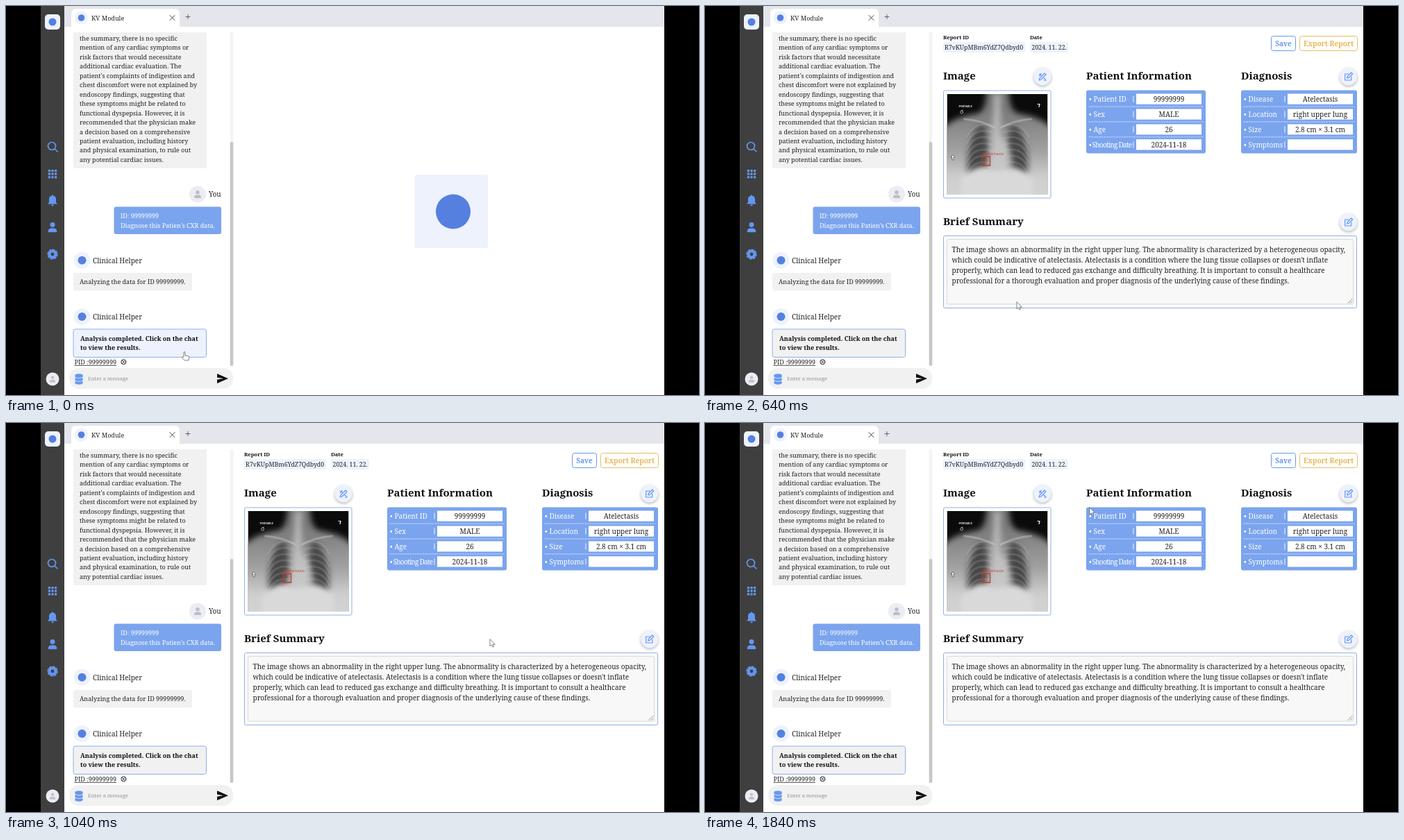
These frames come from a looping animation (998 px wide and 561 px high, 1920 ms). An HTML page with a canvas:

```html
<!DOCTYPE html>
<html lang="en">
<head>
<meta charset="utf-8">
<title>Report viewer</title>
<style>
  html, body { margin: 0; width: 100%; height: 100%; overflow: hidden; background: #000; }
  canvas { display: block; }
</style>
</head>
<body>
<canvas id="stage" width="998" height="561"></canvas>
<script>
const ctx = document.getElementById('stage').getContext('2d');
const LOOP = 1920, STEP = 80, OPEN = 480, LOADED = 640;
const BLUE = '#6497f2', MARK = '#5580e0', PANEL = '#7ba4ee', PALE = '#edf2fd',
      EDGE = '#8db1ea', GREY = '#f1f1f1', DARK = '#3f3f3f', INK = '#222';

function box(x, y, w, h, fill, radius = 0, stroke, lineWidth = 1) {
  ctx.beginPath();
  ctx.roundRect(x, y, w, h, radius);
  if (fill) { ctx.fillStyle = fill; ctx.fill(); }
  if (stroke) { ctx.strokeStyle = stroke; ctx.lineWidth = lineWidth; ctx.stroke(); }
}

function disc(x, y, r, fill) {
  ctx.beginPath();
  ctx.arc(x, y, r, 0, 7);
  ctx.fillStyle = fill;
  ctx.fill();
}

function shape(d, x, y, fill, stroke, lineWidth = 1) {
  const path = new Path2D(d);
  ctx.save();
  ctx.translate(x, y);
  ctx.lineJoin = ctx.lineCap = 'round';
  if (fill) { ctx.fillStyle = fill; ctx.fill(path); }
  if (stroke) { ctx.strokeStyle = stroke; ctx.lineWidth = lineWidth; ctx.stroke(path); }
  ctx.restore();
}

function text(str, x, y, size = 9, color = INK, { bold, align = 'left', spacing = 0 } = {}) {
  ctx.font = `${bold ? 'bold ' : ''}${size}px "Noto Serif", serif`;
  ctx.textAlign = align;
  ctx.letterSpacing = spacing + 'px';
  ctx.fillStyle = color;
  ctx.fillText(str, x, y);
}

const heading = (str, x, y, size = 15) => text(str, x, y, size, '#111', { bold: true });

function lines(list, x, y, leading, size, color, style) {
  list.forEach((str, i) => text(str, x, y + i * leading, size, color, style));
}

function person(x, y, s, color) {
  disc(x, y - 3 * s, 3 * s, color);
  box(x - 5.5 * s, y + 1.2 * s, 11 * s, 5 * s, color, [4 * s, 4 * s, s, s]);
}

function sidebar() {
  box(50, 0, 34, 561, DARK);
  box(56, 12, 22, 22, PALE, 5);
  disc(67, 23, 5.5, MARK);
  shape('M5 0A5.5 5.5 0 1 1-6 0A5.5 5.5 0 1 1 5 0M3.5 4L7.5 8', 66.5, 202, null, BLUE, 1.7);
  for (let i = 0; i < 9; i++) box(60.8 + i % 3 * 4.6, 236 + (i / 3 | 0) * 4.6, 3.2, 3.2, BLUE, .5);
  shape('M-7 5L-5 2.5V-2Q-5-6-1.2-6.8A1.2 1.2 0 0 1 1.2-6.8Q5-6 5-2V2.5L7 5ZM-2 6H2Q1.5 8 0 8T-2 6', 67, 280.5, BLUE);
  person(67, 319, 1.15, BLUE);
  disc(67, 358, 6, BLUE);
  ctx.setLineDash([2.6, 2.6]);
  shape('M6.6 0A6.6 6.6 0 1 1-6.6 0A6.6 6.6 0 1 1 6.6 0', 67, 358, null, BLUE, 2);
  ctx.setLineDash([]);
  disc(67, 358, 2.4, DARK);
  disc(67, 538, 9.5, '#ebecf4');
  person(67, 538, .75, '#c2c2c6');
}

function tabs() {
  box(84, 0, 864, 30, '#e5e6eb');
  box(94, 4, 156, 26, '#fff', [6, 6, 0, 0]);
  disc(108.5, 17, 9.5, PALE);
  disc(108.5, 17, 4.8, MARK);
  text('KV Module', 123, 20.5);
  shape('M-3.5-3.5L3.5 3.5M3.5-3.5L-3.5 3.5', 239.5, 17, null, '#444', 1);
  shape('M-3 0H3M0-3V3', 262, 15.5, null, '#555', .9);
}

function sender(y) {
  disc(109.5, y, 12, PALE);
  disc(109.5, y, 6, MARK);
  text('Clinical Helper', 125, y + 3.7, 10);
}

function chat(hover) {
  box(322.5, 38, 5, 481, '#f4f4f4');
  box(322.8, 196, 4.4, 323, '#c6c6c6', 2);
  box(97, 38, 192, 196, GREY, [0, 0, 3, 3]);
  lines(['the summary, there is no specific', 'mention of any cardiac symptoms or',
    'risk factors that would necessitate', 'additional cardiac evaluation. The',
    "patient's complaints of indigestion and", 'chest discomfort were not explained by',
    'endoscopy findings, suggesting that', 'these symptoms might be related to',
    'functional dyspepsia. However, it is', 'recommended that the physician make',
    'a decision based on a comprehensive', 'patient evaluation, including history',
    'and physical examination, to rule out', 'any potential cardiac issues.'], 106, 49.7, 13.48);

  disc(276, 271.5, 12, '#ebecf4');
  person(276, 271.5, .9, '#bdbdc2');
  text('You', 292, 275.2, 10);
  box(155.5, 289.5, 154.5, 39.5, PANEL, 3);
  lines(['ID: 99999999', 'Diagnose this Patien’s CXR data.'], 165, 306, 13.7, 9, '#fff');

  sender(366.8);
  box(97, 385, 171, 25.5, GREY, 3);
  text('Analyzing the data for ID 99999999.', 106, 401.2);

  sender(448);
  box(97, 466, 191.5, 40.5, hover ? PALE : GREY, 3, EDGE);
  lines(['Analysis completed. Click on the chat', 'to view the results.'], 107, 483, 13.4, 9, '#111', { bold: true });
  text('PID :99999999', 98.5, 516.8);
  box(98.5, 518, 60.5, .8, INK);
  shape('M3.5 0A3.5 3.5 0 1 1-3.5 0A3.5 3.5 0 1 1 3.5 0M-1.5-1.5L1.5 1.5M1.5-1.5L-1.5 1.5', 169.4, 513.4, null, INK, 1);

  box(91, 522, 236, 30, GREY, 14);
  for (const y of [9.4, 4.7, 0])
    shape('M-6 0A6 2.2 0 0 1 6 0V2.4A6 2.2 0 0 1-6 2.4Z', 105, 532.2 + y, BLUE, GREY, .8);
  text('Enter a message', 118, 540, 7.5, '#929292');
  shape('M0 0L16 7L0 14V8.5L9 7L0 5.5Z', 304, 530.3, '#111');
}

function editButton(x, y, wand) {
  ctx.save();
  ctx.shadowColor = 'rgba(0,0,0,.3)';
  ctx.shadowBlur = 4;
  ctx.shadowOffsetY = 1.5;
  disc(x, y, 12.5, PALE);
  ctx.restore();
  if (wand) shape('M-5 5L-4 2L3-5L5-3L-2 4ZM-4-4L-1-1M2 2L5 5L3 5.5M-4.5-1.5L-2-4.5', x, y, null, BLUE, 1.2);
  else shape('M0-4H-5V5H4V0M-2 2L-1.4-.5L4-6L6-4L.5 1.4Z', x, y, null, BLUE, 1.2);
}

function table(x, width, split, rows, filled) {
  box(x, 121.5, width, 91, PANEL, 3);
  rows.forEach(([label, value], i) => {
    const y = 134.2 + i * 21.9, tight = label.length > 12;
    text('•', x + 4, y + 3.6, 10, '#fff');
    text(label, x + (tight ? 8.5 : 10.5), y + 3.6, 10, '#fff', { spacing: tight ? -.72 : 0 });
    box(x + split - 4.5, y - 4.5, .9, 9, '#fff');
    box(x + split, y - 7.6, 94, 15.2, '#fff');
    if (filled) text(value, x + split + 47, y + 3.6, 10, INK, { align: 'center' });
    if (i) {
      ctx.setLineDash([2, 1.6]);
      shape(`M0 0H${width - 8}`, x + 4, y - 11, null, '#dfe9fc', .8);
      ctx.setLineDash([]);
    }
  });
}

// Both pictures use a 145 px square with the spine near x = 73.
function mirrored(d, fill, stroke, lineWidth) {
  for (const side of [-1, 1]) {
    ctx.save();
    ctx.translate(73, 0);
    ctx.scale(side, 1);
    shape(d, 0, 0, fill, stroke, lineWidth);
    ctx.restore();
  }
}

function skeleton(progress) {
  box(0, 0, 145, 145, '#0a1015');
  ctx.save();
  ctx.filter = 'blur(3px)';
  mirrored('M0 0H13Q14 22 36 27Q60 30 65 55L70 120H58Q52 90 46 72Q46 110 36 150H0Z', '#3d525e');
  mirrored('M0 32Q26 28 40 62Q46 96 40 118Q22 112 0 108Z', '#5b717d');
  mirrored('M38 36Q54 28 60 44L64 112H57Q54 80 46 58Z', '#71868f');
  ctx.restore();
  mirrored('M5 36Q24 24 52 31', null, '#b4c6cd', 4);
  mirrored('M20 42Q38 33 52 38L41 70Q28 62 20 42Z', 'rgba(165,188,198,.45)');
  disc(18, 39, 7, '#a3b7bf');
  disc(128, 39, 7, '#a3b7bf');
  for (let i = 0; i < 10; i++) {
    const y = 33 + i * 8.2, w = 20 + 24 * Math.sin((i + 1) / 6.5);
    mirrored(`M4 ${y}C${w * .5} ${y - 6} ${w} ${y + 2} ${w} ${y + 18}`, null, '#9fb4bd', 2.8);
    if (i < 8) mirrored(`M${w} ${y + 18}Q${w * .6} ${y + 27} 6 ${y + 15}`, null, 'rgba(175,198,207,.55)', 2);
  }
  box(66, 36, 13, 62, 'rgba(190,206,213,.55)', 4);
  for (let y = 2; y < 140; y += 7) box(67, y, 12, 5.4, '#b3c5cc', 2);
  mirrored('M3 128Q28 118 38 145H8Z', 'rgba(150,175,187,.5)');
  box(38, 68, 70.5, 7.5, 'rgba(60,85,98,.8)', 4, '#f2fafc');
  box(38, 68, 70.5 * progress, 7.5, '#b5e2ee', 4);
}

function chestScan() {
  box(0, 0, 145, 145, '#0b0b0b');
  ctx.save();
  ctx.filter = 'blur(4px)';
  const body = ctx.createLinearGradient(0, 20, 0, 145);
  body.addColorStop(0, '#777');
  body.addColorStop(.5, '#a2a2a2');
  body.addColorStop(.8, '#cfcfcf');
  body.addColorStop(1, '#d2d2d2');
  shape('M-9 155V52Q8 33 44 28Q57 24 57-9H89Q89 24 102 28Q138 33 154 52V155Z', 0, 0, body);
  mirrored('M19 43Q35 44 42 80Q46 112 40 117Q24 106 15 106Q12 70 19 43Z', '#474747');
  shape('M68 0H77V60Q91 72 95 106L60 110Q66 70 68 0', 0, 0, 'rgba(205,205,205,.75)');
  shape('M20 122Q45 98 68 112Q100 100 124 122V150H20Z', 0, 0, '#d9d9d9');
  ctx.restore();
  for (let i = 0; i < 7; i++)
    mirrored(`M8 ${46 + i * 9}Q34 ${38 + i * 9} 44 ${62 + i * 9}`, null, 'rgba(205,205,205,.17)', 3);
  mirrored('M5 48Q24 38 48 36', null, 'rgba(215,215,215,.35)', 3);
  text('PORTABLE', 17, 19, 3.6, '#fff', { bold: true });
  shape('M2 0A2 2 0 1 1-2 0A2 2 0 1 1 2 0M0-2L2-3', 21, 26, null, '#ddd', .7);
  shape('M-1.5-2H1.5L.5 2', 132, 16.5, null, '#fff', 1.2);
  shape('M0-3.5L2.5-.5H1V3.5H-1V-.5H-2.5Z', 8.5, 91.5, '#fff', '#333', .6);
  box(51, 90, 11, 13, null, 0, '#c23a2c', 1.3);
  text('Atelectasis', 51, 88, 6, '#c8493b');
}

function report(t) {
  const loaded = t >= LOADED;
  heading('Report ID', 343, 48, 7.6);
  box(343, 52, 118, 15, PALE, 2);
  text('R7vKUpMBm6YdZ7Qdbyd0', 345, 62.5, 8.75);
  heading('Date', 468, 48, 7.6);
  if (loaded) {
    box(468, 52, 55, 15, PALE, 2);
    text('2024. 11. 22.', 470.5, 62.5, 8.75);
  }
  box(815.5, 43.5, 35, 21, '#fff', 3, BLUE);
  text('Save', 833, 57.5, 10, BLUE, { bold: true, align: 'center' });
  box(856.5, 43.5, 83, 21, '#fff', 3, '#e8bd62');
  text('Export Report', 898, 57.5, 10, '#e8b655', { bold: true, align: 'center' });

  heading('Image', 343, 106);
  heading('Patient Information', 549, 106);
  heading('Diagnosis', 772, 106);
  heading('Brief Summary', 343, 315.6);
  editButton(486, 102, true);
  editButton(926.7, 102);
  editButton(926.7, 312);

  box(343.5, 122, 154.5, 155, '#fff', 2, EDGE);
  ctx.save();
  ctx.translate(348.5, 127);
  ctx.beginPath();
  ctx.rect(0, 0, 145, 145);
  ctx.clip();
  if (loaded) chestScan();
  else skeleton(.5 + (t - OPEN) / 320);
  ctx.restore();

  table(549, 172, 72, [['Patient ID', '99999999'], ['Sex', 'MALE'], ['Age', '26'],
    ['Shooting Date', '2024-11-18']], loaded);
  table(772, 167, 67, [['Disease', 'Atelectasis'], ['Location', 'right upper lung'],
    ['Size', '2.8 cm × 3.1 cm'], ['Symptoms', '']], loaded);

  box(343.5, 331.5, 595, 104, '#fafafa', 2, EDGE);
  box(348.5, 336.5, 585, 93.5, '#f8f8f8', 2, '#d9d9d9');
  shape('M0 6L6 0M3.5 6L6 3.5', 926, 422.5, null, '#777', .8);
  if (loaded) lines([
    'The image shows an abnormality in the right upper lung. The abnormality is characterized by a heterogeneous opacity,',
    "which could be indicative of atelectasis. Atelectasis is a condition where the lung tissue collapses or doesn't inflate",
    'properly, which can lead to reduced gas exchange and difficulty breathing. It is important to consult a healthcare',
    'professional for a thorough evaluation and proper diagnosis of the underlying cause of these findings.'],
    355.5, 354.8, 15, 10);
}

function welcome() {
  box(588.5, 243.5, 105.5, 105.5, PALE, 3);
  disc(644, 296.5, 25, MARK);
}

// Pointer keys: time, x, y.
const path = [[0, 257, 499], [80, 248, 499], [560, 248, 499], [720, 650, 355], [800, 676, 335],
  [960, 696, 316], [1040, 697, 312], [1600, 697, 312], [1680, 603, 171], [1840, 554, 122], [1920, 554, 122]];

function pointer(t) {
  const i = path.findIndex(key => key[0] > t);
  const [t0, x0, y0] = path[i - 1], [t1, x1, y1] = path[i];
  const k = (t - t0) / (t1 - t0);
  const hand = 'M-1 7V1Q-1-.5 0-.5T1 1V5L6 6Q7 6.3 6.8 8L6 12H0L-3.5 8Q-3.5 6.5-2.3 6.7Z';
  const arrow = 'M0 0V10L2.4 7.8L4 11.3L5.5 10.6L4 7.3H7Z';
  shape(t < LOADED ? hand : arrow, x0 + (x1 - x0) * k, y0 + (y1 - y0) * k, '#fff', '#666', .8);
}

function frame(now) {
  const t = Math.floor(now % LOOP / STEP) * STEP;
  box(0, 0, 998, 561, '#000');
  box(84, 0, 864, 561, '#fff');
  sidebar();
  tabs();
  chat(t < LOADED);
  if (t < OPEN) welcome();
  else report(t);
  pointer(t);
  requestAnimationFrame(frame);
}
requestAnimationFrame(frame);
</script>
</body>
</html>
```
